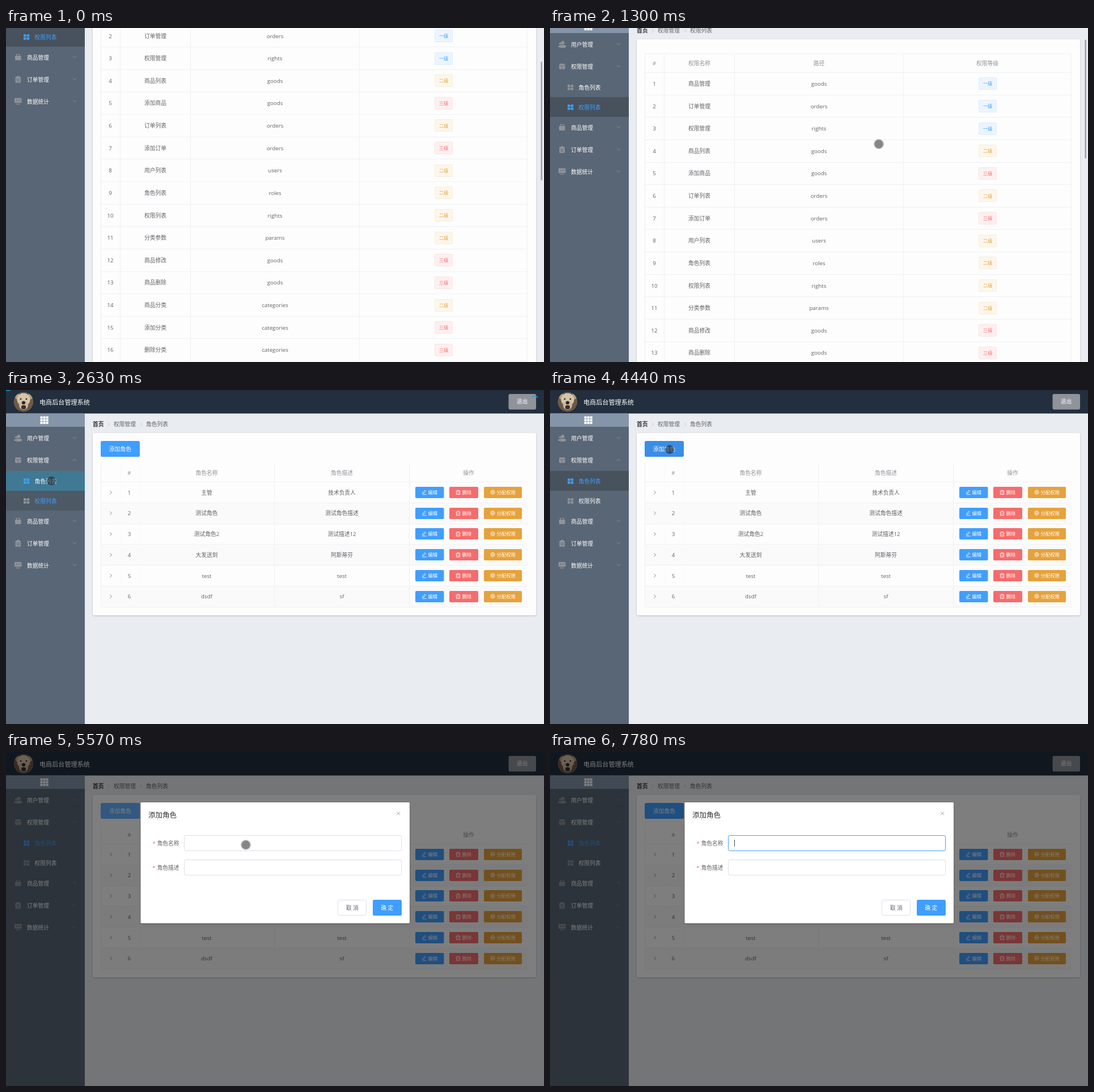
Write an HTML page with a canvas that moves like this. It is 949 by 590 pixels and loops after 8 s.

```html
<!DOCTYPE html>
<html lang="zh-CN">
<head>
<meta charset="utf-8">
<title>电商后台管理系统</title>
<style>
  html, body { margin: 0; width: 100%; height: 100%; overflow: hidden; background: #e9ecf0; }
  canvas { display: block; }
</style>
</head>
<body>
<canvas id="stage" width="949" height="590"></canvas>
<script>
const LOOP = 8000, W = 949, H = 590;
const stage = document.getElementById('stage').getContext('2d');
const layer = new OffscreenCanvas(W, H).getContext('2d');
let ctx = stage;

const FONT = '"Open Sans","Noto Sans CJK SC","Noto Sans CJK",sans-serif';
const BODY = 9.73, SMALL = 8.34;
const BLUE = '#409eff', RED = '#f56c6c', ORANGE = '#e6a23c', GRAY = '#909399';
const INK = '#606266', LINE = '#eff1f5', CARD = '#fdfdfd', SIDE = '#596675', ACTIVE = '#47525d';
const TAP = 'rgba(51,181,229,.4)';

// The screen refreshes only at these moments.
const TICKS = [0, 120, 240, 360, 510, 630, 750, 1150, 1300, 1420, 1690, 1930, 2080, 2200, 2350,
  2630, 2750, 2900, 3020, 3610, 3730, 4440, 4720, 4840, 4990, 5140, 5570, 5720, 5840, 5960,
  6260, 6820, 6970, 7220, 7780];

const SCROLL = [[0, 180], [360, 380], [510, 620], [750, 1197], [1000, 1197], [1150, 260], [1300, 56], [1420, 0]];
// from, to, x, y, pressed
const POINTER = [[1300, 1690, 580, 205, 0], [2080, 2350, 80, 160.5, 0], [2350, 2900, 80, 160.5, 1],
  [3610, 3730, 297, 149, 0], [4440, 4990, 211, 105, 1], [4990, 5140, 228.5, 119.5, 0], [5570, 6970, 423, 164, 0]];

const RIGHTS = `商品管理 goods 1,订单管理 orders 1,权限管理 rights 1,商品列表 goods 2,添加商品 goods 3,
订单列表 orders 2,添加订单 orders 3,用户列表 users 2,角色列表 roles 2,权限列表 rights 2,分类参数 params 2,
商品修改 goods 3,商品删除 goods 3,商品分类 categories 2,添加分类 categories 3,删除分类 categories 3,
角色授权 roles 3,添加角色 roles 3,修改角色 roles 3,删除角色 roles 3,添加用户 users 3,删除用户 users 3,
更新用户 users 3,用户详情 users 3,分配角色 users 3,用户管理 users 1,数据统计 reports 1,数据报表 reports 2,
订单详情 orders 3,更新订单 orders 3,商品详情 goods 3,上传图片 goods 3,更新图片 goods 3,商品属性 goods 3,
更新属性 goods 3,商品状态 goods 3,分类详情 categories 3,获取参数 params 3,添加参数 params 3,
删除参数 params 3,修改参数 params 3`.split(',').map(row => row.trim().split(' '));
const TAGS = [null, ['一级', '#ecf5ff', '#d9ecff', BLUE], ['二级', '#fdf6ec', '#faecd8', ORANGE],
  ['三级', '#fef0f0', '#fde2e2', RED]];
const ROLES = [['主管', '技术负责人'], ['测试角色', '测试角色描述'], ['测试角色2', '测试描述12'],
  ['大发送到', '阿斯蒂芬'], ['test', 'test'], ['dsdf', 'sf']];

const ramp = (t, from, to) => Math.max(0, Math.min(1, (t - from) / (to - from)));

function track(t, keys) {
  const i = keys.findIndex(k => k[0] > t);
  if (i < 0) return keys[keys.length - 1][1];
  if (i === 0) return keys[0][1];
  const [a, b] = [keys[i - 1], keys[i]];
  return a[1] + (b[1] - a[1]) * ramp(t, a[0], b[0]);
}

function mix(a, b, p) {
  const part = (c, i) => parseInt(c.slice(i, i + 2), 16);
  return `rgb(${[1, 3, 5].map(i => Math.round(part(a, i) + (part(b, i) - part(a, i)) * p))})`;
}

function withAlpha(alpha, draw) {
  ctx.save();
  ctx.globalAlpha *= alpha;
  draw();
  ctx.restore();
}

// Draws a group on its own layer, so that it fades as one.
function grouped(alpha, dy, draw) {
  layer.clearRect(0, 0, W, H);
  ctx = layer;
  draw();
  ctx = stage;
  withAlpha(alpha, () => ctx.drawImage(layer.canvas, 0, dy));
}

function box(x, y, w, h, fill, radius = 0, border) {
  ctx.beginPath();
  ctx.roundRect(x, y, w, h, radius);
  ctx.fillStyle = fill;
  ctx.fill();
  if (!border) return;
  ctx.beginPath();
  ctx.roundRect(x + .5, y + .5, w - 1, h - 1, radius);
  ctx.strokeStyle = border;
  ctx.lineWidth = 1;
  ctx.stroke();
}

function dot(x, y, r, fill) {
  ctx.beginPath();
  ctx.arc(x, y, r, 0, 7);
  ctx.fillStyle = fill;
  ctx.fill();
}

function path(points, color, width = 1) {
  ctx.beginPath();
  points.forEach(([x, y]) => ctx.lineTo(x, y));
  ctx.strokeStyle = color;
  ctx.lineWidth = width;
  ctx.stroke();
}

function text(str, x, y, color, { size = BODY, align = 'center', weight = 400 } = {}) {
  ctx.font = `${weight} ${size}px ${FONT}`;
  ctx.textAlign = align;
  ctx.fillStyle = color;
  ctx.fillText(str, x, y + size * .37);
}

function panel(x, y, w, h, fill, radius, shadow) {
  ctx.save();
  ctx.shadowColor = `rgba(0,0,0,${shadow})`;
  ctx.shadowBlur = 3;
  ctx.shadowOffsetY = 1;
  box(x, y, w, h, fill, radius);
  ctx.restore();
}

const card = (y, h) => panel(153, y, 782, h, CARD, 2.8, .2);
const hLine = y => box(167, Math.round(y), 753, 1, LINE);
const vLine = (x, y, h) => box(x, y, 1, h, LINE);

function breadcrumb(page) {
  text('首页', 153, 60.5, '#303133', { align: 'left', weight: 700 });
  text('权限管理', 190, 60.5, INK, { align: 'left' });
  text(page, 247, 60.5, INK, { align: 'left' });
  for (const x of [180, 237]) path([[x, 57.5], [x + 3, 60.5], [x, 63.5]], '#b4b8bf', .8);
}

function rightsPage() {
  const top = 134.5, pitch = 39.63, bottom = top + RIGHTS.length * pitch;
  breadcrumb('权限列表');
  card(76, bottom + 14 - 76);
  [101, 134].forEach(hLine);
  ['#', '权限名称', '路径', '权限等级'].forEach((label, i) =>
    text(label, [184, 263.5, 474.5, 771.5][i], 118.5, GRAY, { weight: 500 }));
  RIGHTS.forEach(([name, route, level], i) => {
    const y = top + (i + .5) * pitch;
    const [tag, fill, border, color] = TAGS[level];
    hLine(y + pitch / 2 - .5);
    text(i + 1, 184, y, INK);
    text(name, 263.5, y, INK);
    text(route, 474.5, y, INK);
    box(756, Math.round(y - 11), 32, 22, fill, 2.8, border);
    text(tag, 772, y, color, { size: SMALL });
  });
  for (const x of [167, 201, 325, 623, 919]) vLine(x, 101, bottom - 101);
}

const rowY = i => 180.9 + i * 36.75;

function rolesPage() {
  breadcrumb('角色列表');
  card(76, 322);
  for (const i of [1, 3, 5]) box(167, rowY(i) - 18, 753, 36.5, '#fafafa');
  ['#', '角色名称', '角色描述', '操作'].forEach((label, i) =>
    text(label, [217.5, 354, 592.5, 816][i], 146, GRAY, { weight: 500 }));
  hLine(162);
  ROLES.forEach(([name, note], i) => {
    const y = rowY(i);
    hLine(y + 18);
    path([[183.5, y - 3], [186.5, y], [183.5, y + 3]], '#777', .9);
    text(i + 1, 217.5, y, INK);
    text(name, 354, y, INK);
    text(note, 592.5, y, INK);
  });
  for (const x of [167, 473, 711]) vLine(x, 129, 254);
  for (const x of [201, 235]) box(x, 129, 1, 254, '#f7f8fa');
}

function pencil(x, y) {
  path([[x - 3, y + 2], [x - 2, y], [x + 1.5, y - 3.5], [x + 3, y - 2], [x - 1, y + 2], [x - 3, y + 2]], '#fff', .9);
  path([[x - 3, y + 4], [x + 4, y + 4]], '#fff', .9);
}

function bin(x, y) {
  path([[x - 4, y - 2], [x + 4, y - 2]], '#fff', .9);
  path([[x - 2, y - 3.5], [x + 2, y - 3.5]], '#fff', .9);
  path([[x - 3, y - 2], [x - 3, y + 4], [x + 3, y + 4], [x + 3, y - 2]], '#fff', .9);
  for (const d of [-1, 1]) path([[x + d, y], [x + d, y + 2.5]], '#fff', .7);
}

function gear(x, y) {
  ctx.strokeStyle = '#fff';
  ctx.lineWidth = .9;
  for (const r of [3.5, 1.5]) {
    ctx.beginPath();
    ctx.arc(x, y, r, 0, 7);
    ctx.stroke();
  }
}

function roleButtons(t) {
  const focus = t >= 4720 ? 1 - ramp(t, 5600, 5960) : 0;
  const fill = t >= 4440 && t < 4720 ? '#3a8ee6' : mix(BLUE, '#66b1ff', focus);
  box(167, 90, 69, 28, fill, 2.8);
  text('添加角色', 201.5, 104.5, '#fff', { weight: 500 });
  ROLES.forEach((_, i) => {
    const y = rowY(i);
    [['编辑', 722, 50.5, BLUE, pencil], ['删除', 782, 51, RED, bin], ['分配权限', 843, 67, ORANGE, gear]]
      .forEach(([label, x, w, color, icon]) => {
        box(x, Math.round(y - 10), w, 20, color, 2);
        icon(x + 15.5, y - .3);
        text(label, x + 22.5, y, '#fff', { size: SMALL, align: 'left', weight: 500 });
      });
  });
}

function avatar() {
  ctx.save();
  ctx.beginPath();
  ctx.arc(31, 21, 17.3, 0, 7);
  ctx.clip();
  box(13, 3, 36, 36, '#6b5a4b');
  dot(21, 12, 5, '#b59c7e');
  dot(42, 12, 5, '#b59c7e');
  dot(31, 17, 11.5, '#d6c4a9');
  dot(31, 27, 8, '#cbb79b');
  for (const x of [26, 36]) dot(x, 16, 1.4, '#33291f');
  dot(31, 22.5, 3, '#2b2521');
  box(27, 27, 8, 7, '#3a2e28', 3);
  ctx.restore();
}

function header() {
  box(0, 0, W, 41.5, '#232f3e');
  avatar();
  text('电商后台管理系统', 59, 22, '#fff', { size: 11.12, align: 'left' });
  box(886.5, 7, 48.5, 27.5, GRAY, 2.8);
  text('退出', 910.5, 20.8, '#fff', { weight: 500 });
}

const MENU_ICONS = [
  y => { dot(22.5, y - 3, 3, GRAY); box(17, y + 1, 11, 5, GRAY, 2.5); dot(18, y - 1.5, 2, GRAY); box(14.5, y + 2, 4, 3, GRAY, 1); },
  y => { box(16, y - 5, 10.5, 10, GRAY, 2); path([[16, y - 2.5], [21, y - .5], [26.5, y - 2.5]], SIDE, .8); path([[21, y], [21, y + 5]], SIDE, .8); },
  y => { box(16, y - 2.5, 10.5, 8, GRAY, 1); path([[18.5, y - 2], [18.5, y - 5], [24, y - 5], [24, y - 2]], GRAY, 1.2); },
  y => { box(16.5, y - 4.5, 9.5, 10.5, GRAY, 1); box(19, y - 6, 4.5, 2.5, GRAY, 1); for (const d of [-1, 2]) box(18.5, y + d, 5.5, 1, SIDE); },
  y => { box(15, y - 6, 12.5, 8.5, GRAY, 1); box(18, y + 4, 6.5, 1.3, GRAY); path([[17, y - 1], [20, y - 3], [22, y - 1], [26, y - 4]], SIDE, .9); },
];
const MENU = [['用户管理', 85.5], ['权限管理', 124.5], ['商品管理', 232], ['订单管理', 271.3], ['数据统计', 310.3]];

function sidebar(t, height) {
  const onRoles = t >= 2630;
  const change = ramp(t, 2630, 3000);
  box(0, 41.7, 139, height, SIDE);
  box(0, 41.7, 139, 23.3, '#8495a9');
  for (let i = 0; i < 9; i++) box(60.5 + i % 3 * 5, 46.5 + Math.floor(i / 3) * 4.8, 4.2, 4, '#fff');

  if (onRoles && t < 4720) box(0, 143, 139, 35, ACTIVE);
  withAlpha(onRoles ? .6 * (1 - change) : 1, () => box(0, 178, 139, 35, ACTIVE));
  if (t >= 2630 && t < 2900) box(0, 143, 139, 35, TAP);

  MENU.forEach(([label, y], i) => {
    const d = i === 1 ? -1.5 : 1.5;
    MENU_ICONS[i](y - .5);
    text(label, 37, y, '#fff', { align: 'left', weight: 500 });
    path([[118, y - 1 - d], [121, y - 1 + d], [124, y - 1 - d]], '#89939e', .9);
  });
  [['角色列表', 161, onRoles, change], ['权限列表', 196, !onRoles, 1 - change]].forEach(([label, y, active, blue]) => {
    for (let i = 0; i < 4; i++)
      box(31 + i % 2 * 5.7, y - 4.8 + (i >> 1) * 5.3, 4.6, 4.2, active ? BLUE : GRAY, .7);
    text(label, 50.5, y, mix('#ffffff', BLUE, blue), { align: 'left' });
  });
}

function loadingBar(t) {
  if (t < 2630 || t >= 3020) return;
  withAlpha(t < 2900 ? 1 : .5, () => {
    box(0, 0, W * track(t, [[2630, .008], [2750, .6], [2900, 1]]), 1.5, '#2299dd');
    const turn = (t - 2630) / 400 * Math.PI * 2;
    ctx.beginPath();
    ctx.arc(932.5, 16.5, 6, turn - 2.4, turn - .5);
    ctx.strokeStyle = '#2299dd';
    ctx.lineWidth = 1.4;
    ctx.stroke();
  });
}

function dialog(t) {
  const focus = ramp(t, 5600, 5960);
  panel(237.5, 89, 474.5, 213.5, '#fff', 1.4, .3);
  text('添加角色', 251, 111.5, '#303133', { size: 12.5, align: 'left' });
  path([[689, 105.5], [695, 111.5]], GRAY, .9);
  path([[695, 105.5], [689, 111.5]], GRAY, .9);
  [['角色名称', 147, mix('#dcdfe6', BLUE, focus)], ['角色描述', 190, '#dcdfe6']].forEach(([label, y, border]) => {
    text('*', 261, y + 14.5, RED);
    text(label, 305.5, y + 14.3, INK, { align: 'right' });
    box(314, y, 384, 28, '#fff', 2.8, border);
  });
  box(585, 261, 51, 28, '#fff', 2.8, '#dcdfe6');
  text('取 消', 610.7, 275, INK);
  box(647, 261, 51, 28, BLUE, 2.8);
  text('确 定', 672.3, 275, '#fff', { weight: 500 });
  if (t >= 5720 && Math.floor((t - 5640) / 520) % 2 === 0) box(325, 155, 1, 12, '#444');
}

function modal(t) {
  if (t < 4720) return;
  box(0, 0, W, H, `rgba(0,0,0,${track(t, [[4720, .4], [4840, .5]])})`);
  if (t < 4840) box(167, 90, 69, 28, TAP, 2.8);
  const alpha = track(t, [[4720, .62], [4840, .93], [4990, 1]]);
  const dy = track(t, [[4720, -6], [4840, -1], [4990, 0]]);
  grouped(alpha, dy, () => dialog(t));
}

function pointer(t) {
  const now = POINTER.find(([from, to]) => t >= from && t < to);
  if (!now) return;
  const [, , x, y, pressed] = now;
  if (pressed) return dot(x, y, 7.8, 'rgba(25,35,45,.58)');
  dot(x, y, 9, 'rgba(110,110,110,.4)');
  dot(x, y, 7.5, '#868686');
}

function draw(t) {
  const onRoles = t >= 2630;
  const scroll = Math.round(track(t, SCROLL));
  box(0, 0, W, H, '#e9ecf0');

  ctx.save();
  ctx.translate(0, -scroll);
  header();
  sidebar(t, onRoles ? H : 1800);
  if (onRoles) {
    rolesPage();
    roleButtons(t);
  } else {
    rightsPage();
  }
  ctx.restore();

  if (!onRoles) {
    withAlpha(1 - ramp(t, 1800, 2200), () => box(943.3, 3 + scroll * .313, 2.7, 210, '#a3a6ab', 1.3));
  }
  loadingBar(t);
  modal(t);
  pointer(t);
}

function frame() {
  const time = performance.now() % LOOP;
  draw(TICKS.filter(tick => tick <= time).pop());
  requestAnimationFrame(frame);
}
frame();
</script>
</body>
</html>
```
